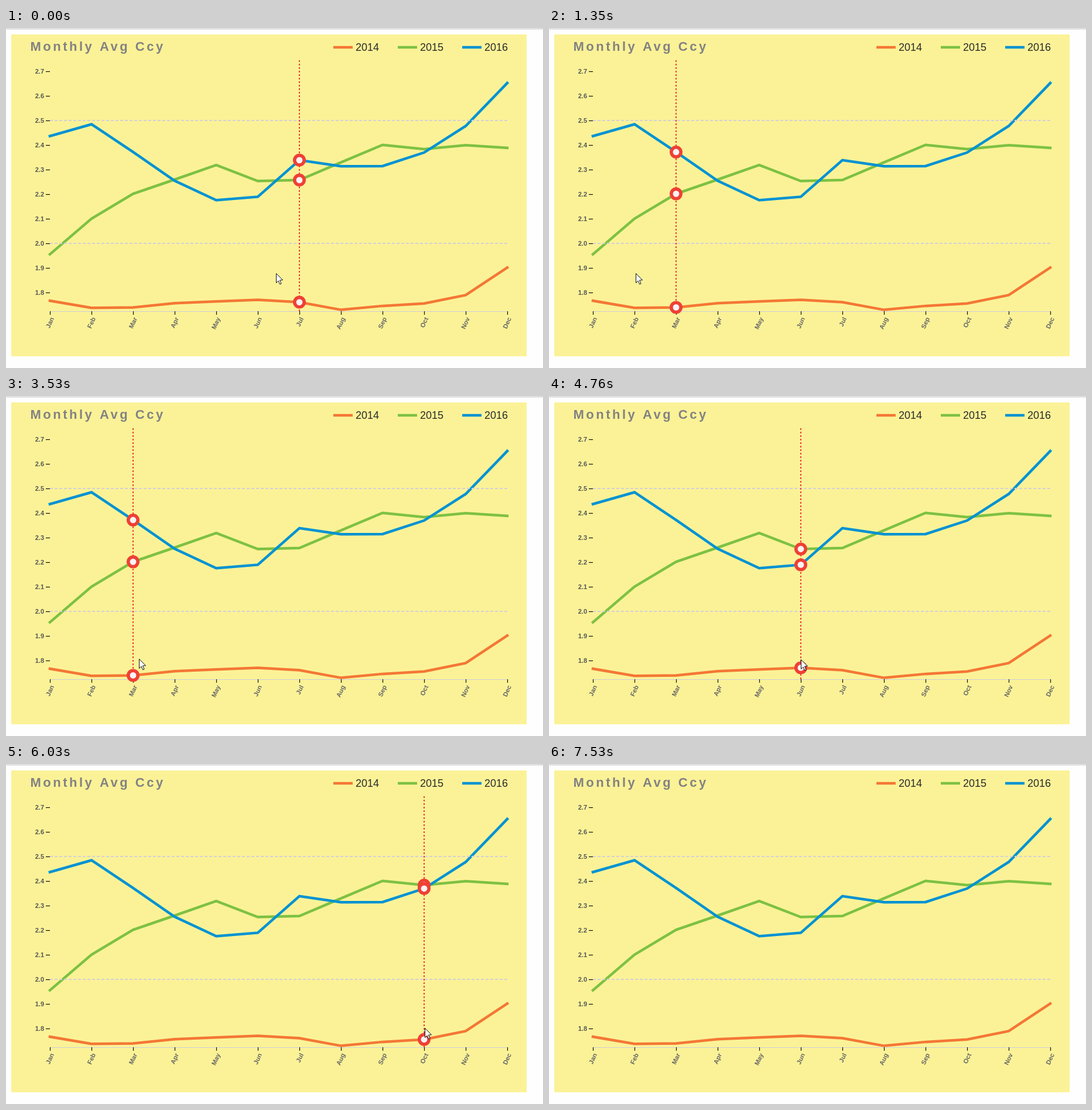
Write an HTML page with a canvas that moves like this. It is 917 px wide and 581 px high and loops after 8.81 s.

```html
<!DOCTYPE html>
<html lang="en">
<head>
<meta charset="utf-8">
<title>Monthly averages</title>
<style>
  html, body { margin: 0; width: 100%; height: 100%; overflow: hidden; background: #fefefe; }
  canvas { display: block; }
</style>
</head>
<body>
<canvas id="stage" width="917" height="581"></canvas>
<script>
const ctx = document.getElementById('stage').getContext('2d');
const LOOP = 8810;
const STEP = 137;
const HIDE_AT = 6950;
const FONT = 'Arial, "Liberation Sans", sans-serif';
const RED = '#ef4035';
const LEFT = 75, GAP = 71, RIGHT = LEFT + 11 * GAP, BASE = 484.5;
const MONTHS = 'Jan Feb Mar Apr May Jun Jul Aug Sep Oct Nov Dec'.split(' ');

// Chart data, one value per month
const SERIES = [
  { year: '2014', color: '#f47735', data: [1.767, 1.738, 1.74, 1.757, 1.764, 1.771, 1.761, 1.73, 1.746, 1.756, 1.79, 1.902] },
  { year: '2015', color: '#7dc143', data: [1.956, 2.101, 2.202, 2.26, 2.319, 2.254, 2.258, 2.33, 2.401, 2.384, 2.4, 2.389] },
  { year: '2016', color: '#0092d2', data: [2.437, 2.485, 2.372, 2.255, 2.176, 2.19, 2.339, 2.314, 2.315, 2.37, 2.478, 2.653] }
];

// Pointer path: time, x, y
const PATH = [
  [0, 461, 419], [950, 200, 420], [1333, 148, 419], [1880, 83, 430],
  [2500, 70, 445], [2703, 81, 445], [3525, 227, 449], [4758, 430, 450],
  [5991, 715, 451], [6950, 837, 448], [7498, 851, 585]
];

const monthX = i => LEFT + i * GAP;
const valueY = v => 74.2 + (2.7 - v) * 420;
const mix = (a, b, k) => a + (b - a) * k;

// The picture is refreshed at a steady rate
const snapTime = t => Math.max(0, Math.floor((t + 37) / STEP) * STEP - 37);

function pointerAt(t) {
  const i = PATH.findIndex(p => p[0] > t);
  if (i < 1) return PATH.at(i).slice(1);
  const [ta, xa, ya] = PATH[i - 1], [tb, xb, yb] = PATH[i];
  const k = Math.max(0, (t - ta) / (tb - ta));
  return [mix(xa, xb, k), mix(ya, yb, k)];
}

function line(x1, y1, x2, y2, color, width, dash = []) {
  ctx.strokeStyle = color;
  ctx.lineWidth = width;
  ctx.setLineDash(dash);
  ctx.beginPath();
  ctx.moveTo(x1, y1);
  ctx.lineTo(x2, y2);
  ctx.stroke();
  ctx.setLineDash([]);
}

function label(str, x, y, font, color, align = 'left') {
  ctx.font = `${font} ${FONT}`;
  ctx.fillStyle = color;
  ctx.textAlign = align;
  ctx.fillText(str, x, y);
}

function drawHeader() {
  ctx.letterSpacing = '3.5px';
  label('Monthly Avg Ccy', 41.5, 39, 'bold 22px', '#828282');
  ctx.letterSpacing = '0px';
  SERIES.forEach(({ year, color }, i) => {
    const x = 559 + 110 * i;
    line(x, 33, x + 33, 33, color, 4.5);
    label(year, x + 38, 39, '18px', '#2b2b2b');
  });
}

function drawAxes() {
  for (let i = 0; i < 10; i++) {
    const y = 74 + 42 * i;
    line(68, y + .5, LEFT, y + .5, '#111', 1.2);
    label((2.7 - i / 10).toFixed(1), 65, y + 4, 'bold 11px', '#555', 'right');
  }
  line(LEFT, BASE, RIGHT, BASE, '#cfcfd6', 1);
  MONTHS.forEach((name, i) => {
    const x = monthX(i);
    line(x + .5, 484, x + .5, 490, '#111', 1.2);
    ctx.save();
    ctx.translate(x + 1.5, 484);
    ctx.rotate(-65 * Math.PI / 180);
    label(name, -8.8, 10.65, 'bold 11px', '#666', 'right');
    ctx.restore();
  });
}

function drawSeries() {
  ctx.lineCap = 'square';
  ctx.lineWidth = 4.5;
  for (const { color, data } of SERIES) {
    ctx.strokeStyle = color;
    ctx.beginPath();
    data.forEach((v, i) => ctx.lineTo(monthX(i), valueY(v)));
    ctx.stroke();
  }
  ctx.lineCap = 'butt';
}

function drawGuide(i) {
  const x = monthX(i);
  line(x, 484, x, 55, RED, 2, [3, 3]);
  for (const { data } of SERIES) {
    ctx.beginPath();
    ctx.arc(x, valueY(data[i]), 8.2, 0, 2 * Math.PI);
    ctx.fillStyle = '#f9f3f5';
    ctx.fill();
    ctx.strokeStyle = RED;
    ctx.lineWidth = 5.6;
    ctx.stroke();
  }
}

const ARROW = new Path2D('M0 0V16L3.6 12.6L6.2 18.4L8.6 17.4L6 11.5L11 11.2Z');

function drawPointer(x, y) {
  ctx.save();
  ctx.translate(Math.round(x) + .5, Math.round(y) + .5);
  ctx.fillStyle = '#fff';
  ctx.fill(ARROW);
  ctx.strokeStyle = '#111';
  ctx.lineWidth = 1;
  ctx.stroke(ARROW);
  ctx.restore();
}

function draw(now) {
  const t = snapTime(now % LOOP);
  ctx.fillStyle = '#fefefe';
  ctx.fillRect(0, 0, 917, 581);
  ctx.fillStyle = '#b9b9b9';
  ctx.fillRect(0, 1, 917, 1);
  ctx.fillStyle = '#fbf297';
  ctx.fillRect(9, 11, 880, 550);

  drawHeader();
  drawAxes();
  drawSeries();
  for (const y of [158, 368]) line(LEFT, y, RIGHT, y, '#d3d0d6', 2, [5, 3]);

  // The guide trails the pointer by one refresh
  if (t < HIDE_AT) {
    const [x] = pointerAt(t - STEP);
    drawGuide(Math.max(0, Math.ceil((x - LEFT) / GAP)));
  }
  drawPointer(...pointerAt(t));
}

const start = performance.now();
function tick() {
  draw(performance.now() - start);
  requestAnimationFrame(tick);
}
tick();
</script>
</body>
</html>
```
